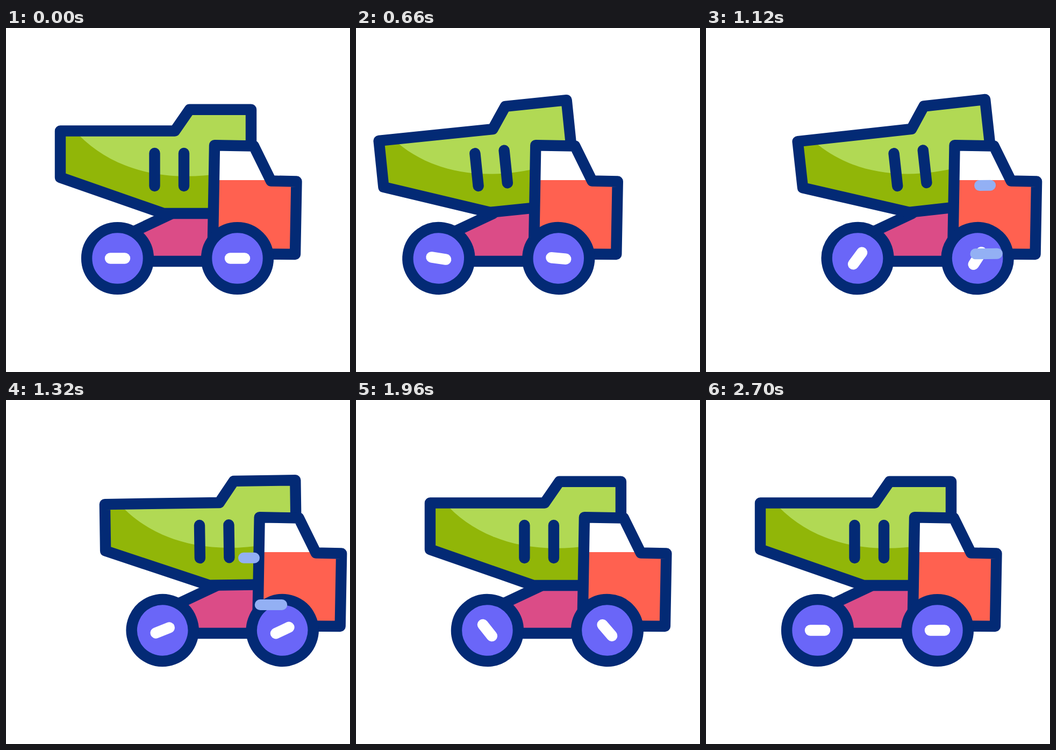
Write an HTML page that moves like this. It is 640 by 640 pixels and loops after 2960 ms.

```html
<!DOCTYPE html>
<html lang="en">
<head>
<meta charset="utf-8">
<title>Dump truck</title>
<style>
  html, body { margin: 0; width: 100%; height: 100%; overflow: hidden; background: #fff; }
  svg { display: block; width: 100%; height: 100%; }
  .ink { stroke: #032a75; stroke-width: 20.4; stroke-linecap: round; stroke-linejoin: round; }
  .dash { stroke: #93b0f4; stroke-width: 20; stroke-linecap: round; }
</style>
</head>
<body>
<svg viewBox="0 0 640 640">
  <defs>
    <path id="binShape" d="M101 191.5H314L341.5 151.8H456V345H293L101 278Z"/>
    <path id="cabShape" d="M388 218.2L461 219.5L493 284.5L540.5 285.5L538 421L384.5 420Z"/>
    <clipPath id="binClip"><use href="#binShape"/></clipPath>
    <clipPath id="cabClip"><use href="#cabShape"/></clipPath>
    <g id="wheel">
      <circle class="ink" r="57.4" fill="#6a66f8"/>
      <path d="M-13.5 0H13.5" stroke="#fff" stroke-width="20.4" stroke-linecap="round"/>
    </g>
  </defs>
  <g id="truck">
    <path d="M207 393L309 345H388V434H207Z" fill="#db4c87"/>
    <path class="ink" fill="none" d="M309 345L207 393M207 434H388"/>
    <g id="bin">
      <g clip-path="url(#binClip)">
        <rect x="90" y="140" width="380" height="215" fill="#b1d954"/>
        <path d="M90 191H128C180 250 270 290 400 271H470V360H90Z" fill="#91b608"/>
      </g>
      <use href="#binShape" class="ink" fill="none"/>
      <path class="ink" d="M276.5 233V294M331 233V294"/>
    </g>
    <g clip-path="url(#cabClip)">
      <rect x="375" y="205" width="180" height="78" fill="#fff"/>
      <rect x="375" y="283" width="180" height="150" fill="#ff6150"/>
    </g>
    <use href="#cabShape" class="ink" fill="none"/>
    <use href="#wheel" id="rear"/>
    <use href="#wheel" id="front"/>
  </g>
  <line class="dash" id="high"/>
  <line class="dash" id="low"/>
</svg>
<script>
const LOOP = 2960;
const $ = id => document.getElementById(id);
const clamp = v => Math.min(1, Math.max(0, v));
const mix = (a, b, p) => a + (b - a) * p;
const smooth = u => u * u * (3 - 2 * u);

// Keys are [time, value, lead]; lead makes the ease into that key start sooner.
function track(keys, t) {
  for (let i = 1; i < keys.length; i++) {
    const [t0, v0] = keys[i - 1], [t1, v1, lead = 0] = keys[i];
    if (t < t1) {
      const u = (t - t0) / (t1 - t0);
      return mix(v0, v1, smooth(u + lead * u * (1 - u)));
    }
  }
  return keys[keys.length - 1][1];
}

const DRIVE = [[0, 0], [620, -55.5], [1220, 85], [2580, 0]];
const TILT = [[0, 0], [1000, -8], [1400, 0]];
const SPIN = [[0, 0], [620, -360], [1220, 360], [2580, -720, 0.145]];
const SLIP = [[0, 0], [300, -4], [1700, -4], [2240, 0]];

function placeWheel(id, x, angle) {
  $(id).setAttribute("transform", `translate(${x} 428.5) rotate(${angle})`);
}

function placeDash(id, t, from, to, length, growth) {
  const p = (t - 940) / 380;
  const size = clamp((t - 860) / growth) * clamp((1460 - t) / 80);
  const x = mix(from[0], to[0], p), y = mix(from[1], to[1], p);
  const half = length * size / 2, lift = 0.03 * half * clamp(1 - p);
  const line = $(id);
  line.style.display = size > 0 ? "" : "none";
  const ends = { x1: x - half, y1: y + lift, x2: x + half, y2: y - lift };
  for (const k in ends) line.setAttribute(k, ends[k]);
}

function draw(t) {
  $("truck").setAttribute("transform", `translate(${track(DRIVE, t)} 0)`);
  $("bin").setAttribute("transform", `rotate(${track(TILT, t)} 278.5 247)`);
  const spin = track(SPIN, t);
  placeWheel("rear", 207.5, spin);
  placeWheel("front", 430.5, spin + track(SLIP, t));
  placeDash("high", t, [579.5, 292], [452, 293.7], 20, 100);
  placeDash("low", t, [547.5, 455], [493, 381], 40.5, 80);
}

let start;
function tick(now) {
  start ??= now;
  draw((now - start) % LOOP);
  requestAnimationFrame(tick);
}
draw(0);
requestAnimationFrame(tick);
</script>
</body>
</html>
```
